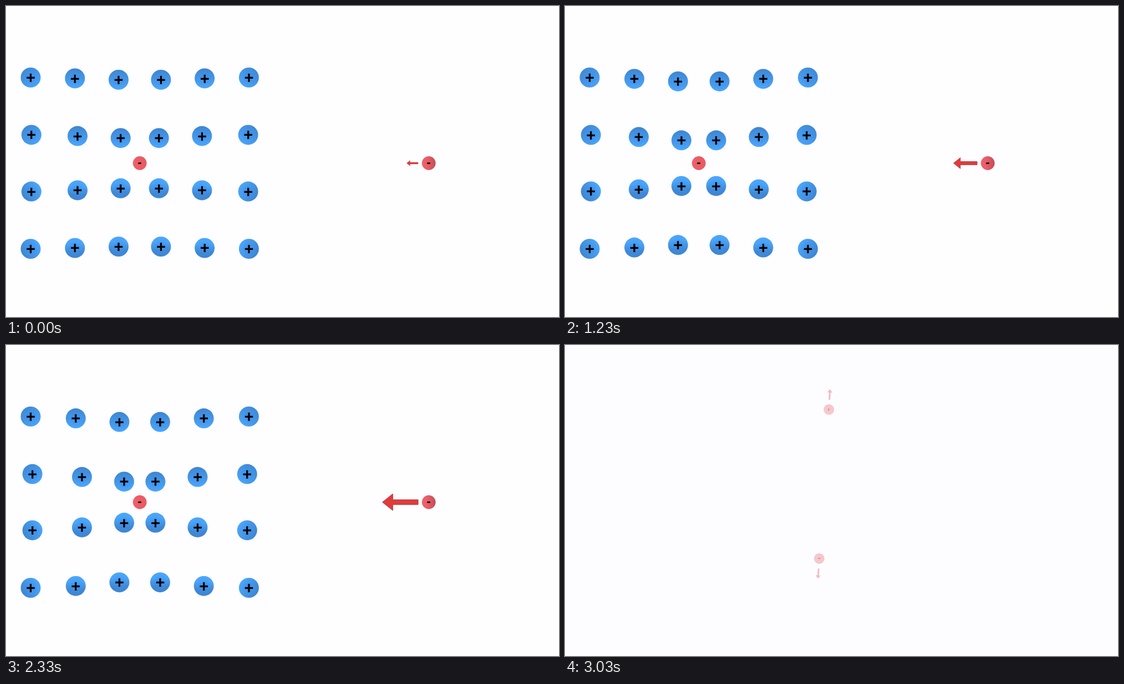
Animation, 997 px wide and 561 px high, one loop 3060 ms. Source, as an HTML page with a canvas:

```html
<!DOCTYPE html>
<html lang="en">
<head>
<meta charset="utf-8">
<title>Electrons and lattice</title>
<style>
html, body { margin: 0; width: 100%; height: 100%; overflow: hidden; background: #fefdff; }
canvas { display: block; }
</style>
</head>
<body>
<canvas id="stage" width="997" height="561"></canvas>
<script>
const ctx = document.getElementById('stage').getContext('2d');
const LOOP = 3060, CX = 241.2, CY = 283.5;
const clamp = v => Math.max(0, Math.min(1, v));

// Upper left ions: start x, y, then end x, y; the others are mirrored.
const ions = [
  [44.5, 129, 44.5, 129], [124.3, 130.5, 126, 132.6], [203, 133, 204.7, 139.7],
  [45.8, 232.4, 47.9, 232.9], [129, 234.6, 138.1, 238.6], [206.7, 238.2, 213.9, 247.6]
];

function sign(text, size) {
  ctx.font = `bold ${size}px "Liberation Sans", Arial, sans-serif`;
  ctx.textAlign = 'center';
  const m = ctx.measureText(text);
  ctx.fillStyle = '#000';
  ctx.fillText(text, 0, (m.actualBoundingBoxAscent - m.actualBoundingBoxDescent) / 2);
}

function disc(r, fill) {
  ctx.fillStyle = fill;
  ctx.beginPath();
  ctx.arc(0, 0, r, 0, Math.PI * 2);
  ctx.fill();
}

function at(x, y, angle, draw) {
  ctx.save();
  ctx.translate(x, y);
  ctx.rotate(angle);
  draw();
  ctx.restore();
}

function ion(x, y) {
  at(x, y, 0, () => {
    const dx = x < 90 ? -14 : x > 390 ? 14 : 0, dy = y < CY ? -16 : 8;
    const rim = ctx.createLinearGradient(dx, dy, -dx, -dy);
    rim.addColorStop(0, '#3f87d3');
    rim.addColorStop(1, '#4aa5fa');
    disc(18, rim);
    const core = ctx.createRadialGradient(0, 0, 0, 0, 0, 14);
    core.addColorStop(0, 'rgba(60,138,226,.8)');
    core.addColorStop(1, 'rgba(66,150,238,0)');
    disc(14, core);
    sign('+', 29);
  });
}

function electron(x, y, r, angle, shade) {
  at(x, y, angle, () => {
    const g = ctx.createLinearGradient(-r, 0, r, 0);
    g.addColorStop(0, '#f0626b');
    g.addColorStop(0.4, '#ea5d66');
    g.addColorStop(1, shade);
    disc(r, g);
    sign('-', r * 1.75);
  });
}

// Arrow from its tail, pointing right before rotation.
function arrow(x, y, length, angle) {
  at(x, y, angle, () => {
    const neck = length * 0.71, shaft = length * 0.068, head = length * 0.232;
    ctx.beginPath();
    for (const [px, py] of [[0, -shaft], [neck, -shaft], [neck, -head], [length, 0],
                            [neck, head], [neck, shaft], [0, shaft]]) ctx.lineTo(px, py);
    ctx.closePath();
    ctx.fillStyle = '#df3b3d';
    ctx.fill();
    ctx.strokeStyle = '#b93236';
    ctx.lineWidth = Math.min(1, length / 50);
    ctx.stroke();
  });
}

function lattice(t) {
  const s = Math.min(t, 2700) / 1000;
  const pull = 16.9 * s + 0.82 * s * s;
  const k = pull / 50.1;
  for (const [x0, y0, x1, y1] of ions) {
    const x = x0 + (x1 - x0) * k, y = y0 + (y1 - y0) * k;
    for (const px of [x, 2 * CX - x]) for (const py of [y, 2 * CY - y]) ion(px, py);
  }
  electron(CX, CY, 12.4, 0, '#ea5a63');
  electron(762.2, CY, 12.4, 0, '#c14e57');
  arrow(743, CY, 20.5 + pull, Math.PI);
}

function pair() {
  electron(475.8, 116.5, 9.5, -1.5, '#ea5a63');
  arrow(476.7, 98.5, 18.5, -1.51);
  electron(458.4, 385.2, 9.5, 0.07, '#ea5a63');
  arrow(457.2, 403.5, 17.5, 1.64);
}

function frame(now) {
  const t = now % LOOP;
  ctx.fillStyle = '#fefdff';
  ctx.fillRect(0, 0, 997, 561);
  let veil;
  if (t < 2955) {
    lattice(t);
    veil = clamp((t - 2705) / 250);
  } else {
    pair();
    veil = 1 - Math.min(0.34, (t - 2955) / 220);
  }
  ctx.globalAlpha = veil;
  ctx.fillStyle = '#fefdff';
  ctx.fillRect(0, 0, 997, 561);
  ctx.globalAlpha = 1;
}

const start = performance.now();
function tick() {
  frame(performance.now() - start);
  requestAnimationFrame(tick);
}
tick();
</script>
</body>
</html>
```
